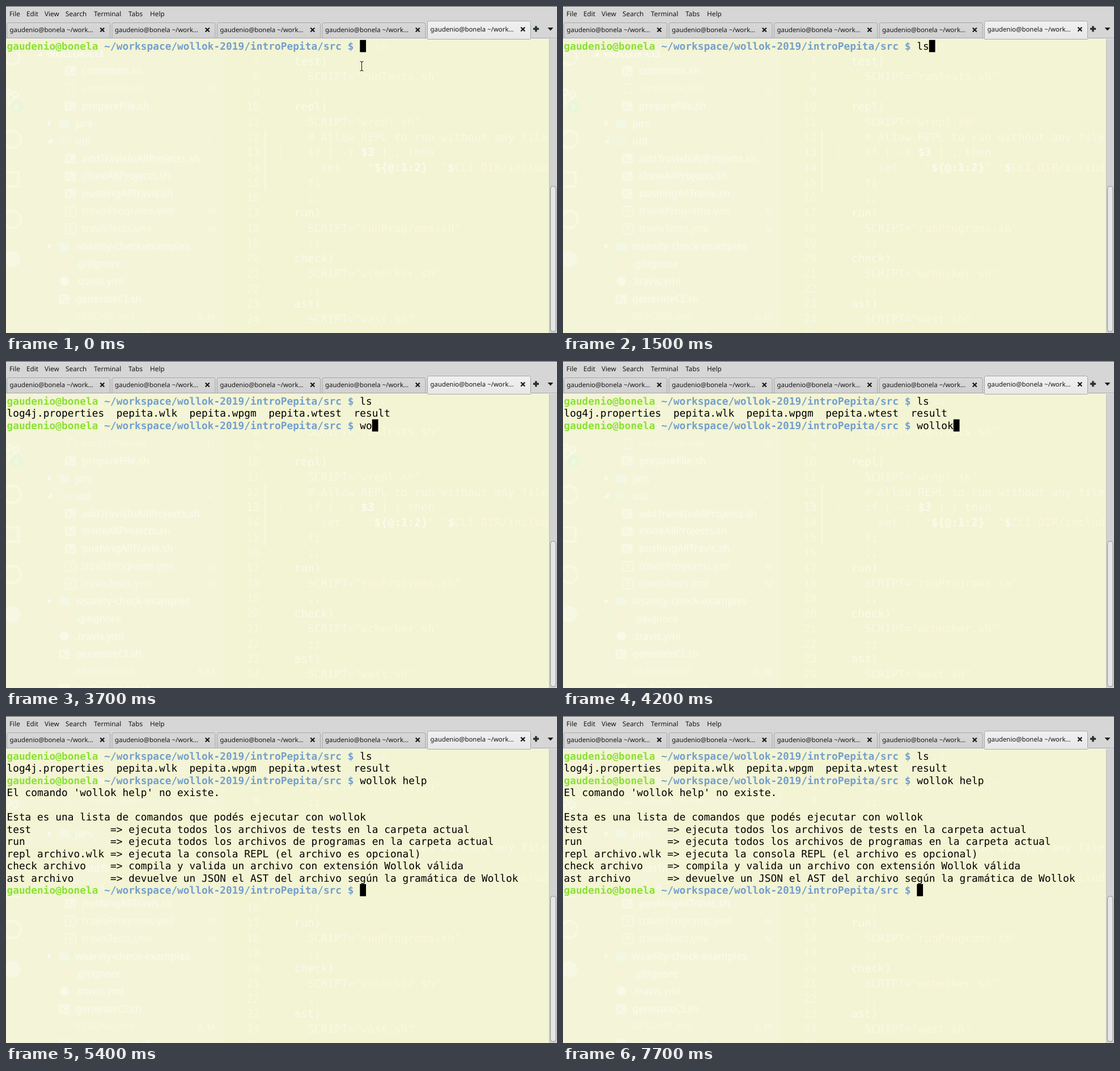
Animation of 972 by 576 pixels, one loop 8 s. Source, as an HTML page with a canvas:

```html
<!DOCTYPE html>
<html lang="es">
<head>
<meta charset="utf-8">
<title>Terminal</title>
<style>
html, body { margin: 0; width: 100%; height: 100%; overflow: hidden; background: #d6d6d6; }
canvas { display: block; }
</style>
</head>
<body>
<canvas id="stage" width="972" height="576"></canvas>
<script>
const W = 972, H = 576, LOOP = 8000;
const ctx = document.getElementById('stage').getContext('2d');
const MONO = '"DejaVu Sans Mono", monospace';
const SANS = '"Noto Sans", "Open Sans", sans-serif';
const CELL = 10.74, LEFT = 1.4, ROW = 21.47, TOP = 59.8;
const USER = 'gaudenio@bonela';
const PATH = ' ~/workspace/wollok-2019/introPepita/src $ ';
const PROMPT = USER.length + PATH.length;

const FILES = 'log4j.properties  pepita.wlk  pepita.wpgm  pepita.wtest  result';
const HELP = [
  "El comando 'wollok help' no existe.",
  '',
  'Esta es una lista de comandos que podés ejecutar con wollok',
  'test             => ejecuta todos los archivos de tests en la carpeta actual',
  'run              => ejecuta todos los archivos de programas en la carpeta actual',
  'repl archivo.wlk => ejecuta la consola REPL (el archivo es opcional)',
  'check archivo    => compila y valida un archivo con extensión Wollok válida',
  'ast archivo      => devuelve un JSON el AST del archivo según la gramática de Wollok'
];

// start time, commands already run, text being typed, block cursor, pointer
const STEPS = [
  [0, 0, '', 1, 1], [400, 0, '', 1], [500, 0, 'l', 1], [600, 0, 'ls', 1],
  [1200, 0, 'ls', 0], [1500, 0, 'ls', 1],
  [1600, 1, '', 1], [2100, 1, '', 0], [3200, 1, '', 1], [3500, 1, '', 0],
  [3600, 1, 'w', 1], [3700, 1, 'wo', 1], [3800, 1, 'wol', 1],
  [4000, 1, 'woll', 1], [4100, 1, 'wollo', 1], [4200, 1, 'wollok', 1],
  [4300, 1, 'wollok ', 1], [4500, 1, 'wollok h', 1],
  [4700, 1, 'wollok he', 1], [4800, 1, 'wollok help', 1],
  [5400, 2, '', 1], [6000, 2, '', 0], [6600, 2, '', 1],
  [7100, 2, '', 0], [7700, 2, '', 1]
];

const PAPER = '#f3f4d3';
const white = a => `rgba(255,255,255,${a})`;

function box(x, y, w, h, fill) {
  ctx.fillStyle = fill;
  ctx.fillRect(x, y, w, h);
}

function round(x, y, w, h, r, fill, line) {
  ctx.beginPath();
  ctx.roundRect(x, y, w, h, r);
  ctx.fillStyle = fill;
  ctx.fill();
  if (line) {
    ctx.strokeStyle = line;
    ctx.lineWidth = 1;
    ctx.stroke();
  }
}

function path(points, line, width, fill) {
  ctx.beginPath();
  points.forEach(([x, y], i) => i ? ctx.lineTo(x, y) : ctx.moveTo(x, y));
  if (fill) {
    ctx.fillStyle = fill;
    ctx.fill();
  } else {
    ctx.strokeStyle = line;
    ctx.lineWidth = width;
    ctx.stroke();
  }
}

function disc(x, y, r, fill) {
  ctx.beginPath();
  ctx.arc(x, y, r, 0, 7);
  ctx.fillStyle = fill;
  ctx.fill();
}

function ring(x, y, r) {
  ctx.beginPath();
  ctx.arc(x, y, r, 0, 7);
  ctx.strokeStyle = white(0.3);
  ctx.lineWidth = 4;
  ctx.stroke();
}

function label(text, x, y, size, color, weight = '') {
  ctx.font = `${weight} ${size}px ${SANS}`;
  ctx.fillStyle = color;
  ctx.fillText(text, x, y);
}

// Fixed pitch text, one glyph per cell
function mono(text, x, y, size, pitch, color, weight = '') {
  ctx.font = `${weight} ${size}px ${MONO}`;
  ctx.fillStyle = color;
  [...text].forEach((c, i) => c !== ' ' && ctx.fillText(c, x + i * pitch, y));
}

function drawActivity() {
  const tone = white(0.3);
  ring(11, 90, 13);
  path([[2, 100], [-6, 109]], tone, 4);
  ring(4, 152, 5);
  ring(17, 156, 5);
  path([[4, 157], [4, 176]], tone, 3);
  path([[17, 161], [5, 172]], tone, 3);
  disc(19, 177, 11, '#ebf5da');
  label('8', 15, 182, 13, white(0.6));
  ring(11, 235, 15);
  ctx.strokeRect(-2, 293, 24, 25);
  ring(11, 376, 15);
  disc(11, 446, 14, tone);
}

function drawTree() {
  // kind: s script, y yaml, d document, f folder, o open folder, r readme
  const tree = [
    ['s', 'commons.sh'], ['d', 'emptyFile.wlk', 'U'], ['s', 'prepareFile.sh'],
    ['f', 'jars'], ['o', 'util', '•'], ['s', 'addTravisInAllProjects.sh'],
    ['s', 'cloneAllProjects.sh'], ['s', 'pushingAllTravis.sh'],
    ['y', 'travisPrograms.yml', 'M'], ['y', 'travisTests.yml', 'M'],
    ['f', 'wsanity-check-examples'], ['g', '.gitignore'], ['t', '.travis.yml'],
    ['s', 'generateCI.sh'], ['r', 'README.md', '8, M'], ['s', 'runPrograms.sh']
  ];
  label('WOLLOK-CLI', 72, 90, 16, white(0.5), 'bold');
  path([[54, 89], [63, 89], [63, 80]], 0, 0, white(0.5));
  tree.forEach(([kind, name, mark], i) => {
    const y = 114 + 30.9 * i;
    const deep = i < 3 || (i > 4 && i < 10);
    const x = deep ? 134 : 122.5, ix = deep ? 114 : 103;
    const dim = kind === 'd' || kind === 'r';
    label(name, x, y + 6, 17.75, white(dim ? 0.26 : kind === 'y' ? 0.44 : 0.54));
    if (mark) label(mark, mark.length > 1 ? 338 : 356, y + 6, 15, white(0.36));
    if (kind === 's') {
      round(ix - 10, y - 8, 19, 17, 2, white(0.34));
      path([[ix - 6, y - 4], [ix - 2, y], [ix - 6, y + 4]], PAPER, 2);
      path([[ix, y + 4], [ix + 6, y + 4]], PAPER, 2);
    } else if (kind === 'y') {
      round(ix - 9, y - 8, 18, 17, 1, white(0), white(0.55));
      label('Y', ix - 4, y + 5, 13, white(0.5));
    } else if (kind === 'd') {
      round(ix - 6, y - 8, 13, 17, 1, white(0), white(0.35));
    } else if (kind === 'f' || kind === 'o') {
      const tint = kind === 'f' ? '#f2f8e4' : '#f1f7dc';
      box(ix - 9, y - 7, 9, 2, tint);
      box(ix - 9, y - 5, 18, 13, tint);
      const arrow = kind === 'f'
        ? [[74, y - 5], [80, y], [74, y + 5]]
        : [[72, y + 4], [81, y + 4], [81, y - 5]];
      path(arrow, 0, 0, white(0.5));
    } else if (kind === 'r') {
      label('M↓', ix - 8, y + 5, 12, '#eff6dc', 'bold');
    } else {
      disc(ix, y, 8, kind === 'g' ? '#f8f3d6' : white(0.4));
    }
  });
}

function drawCode() {
  const size = 19.55, pitch = 11.77, x0 = 508.5;
  const code = [
    'test)', '  SCRIPT="runTests.sh"', '  ;;',
    'repl)', '  SCRIPT="wrepl.sh"', '  # Allow REPL to run without any file',
    '  if [ -z $3 ] ; then', '    set -- "${@:1:2}" "$CLI_DIR/includ', '  fi', '  ;;',
    'run)', '  SCRIPT="runPrograms.sh"', '  ;;',
    'check)', '  SCRIPT="wchecker.sh"', '  ;;',
    'ast)', '  SCRIPT="wast.sh"', '  ;;'
  ];
  const tones = [
    [/\$\{.*\}|\$\d?/g, white(0.6), 'bold'],
    [/".*$/g, 'rgba(255,252,234,.55)'],
    [/\S/g, white(0.44)]
  ];
  mono('in', 649.5, 77, size, pitch, white(0.28));
  code.forEach((line, i) => {
    const y = 104 + 26.7 * i, n = String(i + 7);
    mono(n, 447.5 - n.length * pitch, y, size, pitch, white(i === 6 ? 0.5 : 0.38));
    if (line[0] !== ' ') return mono(line, x0, y, size, pitch, white(0.56));
    let rest = line;
    for (const [rule, color, weight] of tones) {
      rest = rest.replace(rule, (part, at) => {
        mono(part, x0 + at * pitch, y, size, pitch, color, weight);
        return ' '.repeat(part.length);
      });
    }
  });
  box(455, 218, 4, 107, white(0.25));
  box(485, 244, 1, 27, white(0.3));
  box(508, 108, 1, 54, white(0.1));
  box(532, 271, 1, 27, white(0.15));
}

function drawChrome() {
  box(0, 0, W, 58, '#d6d6d6');
  box(0, 0, W, 1, '#555');
  const menu = { File: 6, Edit: 36, View: 68, Search: 105, Terminal: 155, Tabs: 216, Help: 254 };
  for (const name in menu) label(name, menu[name], 17.5, 11.8, '#151515');
  for (let i = 0; i < 5; i++) {
    const x = 1 + 185.5 * i, on = i === 4, y = on ? 41 : 42;
    const fill = ctx.createLinearGradient(0, 27, 0, 57);
    fill.addColorStop(0, on ? '#f0f0f0' : '#d8d8d8');
    fill.addColorStop(1, on ? '#e8e8e8' : '#d0d0d0');
    round(x + 0.5, on ? 26.5 : 29.5, 182, on ? 32 : 27, [3, 3, 0, 0], fill, '#a6a6a6');
    label(USER + ' ~/work...', x + 5.5, y + 4, 11.4, '#151515');
    const cx = x + 168.8;
    path([[cx - 3.5, y - 3.5], [cx + 3.5, y + 3.5]], '#1c1c1c', 2.3);
    path([[cx + 3.5, y - 3.5], [cx - 3.5, y + 3.5]], '#1c1c1c', 2.3);
  }
  box(0, 56, 743, 1, '#a8a8a8');
  box(925, 56, 47, 1, '#a8a8a8');
  box(0, 57, W, 1, '#ececec');
  box(930, 38.5, 10, 3.5, '#27332b');
  box(933.2, 35.3, 3.5, 10, '#27332b');
  path([[955.5, 38], [965.5, 38], [960.5, 43.5]], 0, 0, '#1c1c1c');

  box(958, 58, 14, H - 58, '#d2d2d2');
  box(958, 58, 1, H - 58, '#bebebe');
  round(960.5, 317.5, 9.5, 256, 4, '#e6e6e6', '#8f8f8f');
}

// Printed cells hide the window shining through
function print(text, row, col = 0, color = '#000', weight = '') {
  for (const run of text.matchAll(/\S+( \S+)*/g)) {
    box(LEFT + (col + run.index) * CELL, TOP + row * ROW, run[0].length * CELL, ROW, PAPER);
  }
  mono(text, LEFT + col * CELL, Math.round(77 + row * ROW), 17.84, CELL, color, weight);
}

function prompt(row, command) {
  print(USER, row, 0, '#8ae234', 'bold');
  print(PATH, row, USER.length, '#729fcf', 'bold');
  print(command, row, PROMPT);
}

function drawPointer() {
  const bar = [[624.5, 97.5], [627.5, 98.5], [630.5, 97.5]];
  const foot = bar.map(([x, y]) => [x, 212 - y]);
  const stem = [[627.5, 98], [627.5, 114]];
  for (const [color, width] of [[white(0.7), 3], ['#222', 1.2]]) {
    [bar, stem, foot].forEach(part => path(part, color, width));
  }
}

function draw([, done, typed, cursor, pointer]) {
  box(0, 0, W, H, PAPER);
  box(0, 58, 386, H, white(0.1));
  drawActivity();
  drawTree();
  drawCode();
  drawChrome();
  if (done > 0) {
    prompt(0, 'ls');
    print(FILES, 1);
  }
  if (done > 1) {
    prompt(2, 'wollok help');
    HELP.forEach((line, i) => print(line, 3 + i));
  }
  const row = [0, 2, 11][done];
  prompt(row, typed);
  if (cursor) box(LEFT + (PROMPT + typed.length) * CELL, TOP + row * ROW, CELL, ROW, '#000');
  if (pointer) drawPointer();
}

ctx.textRendering = 'geometricPrecision';
const start = performance.now();
let shown;

function tick() {
  const t = (performance.now() - start) % LOOP;
  const step = STEPS.findLast(s => s[0] <= t);
  if (step !== shown) draw(shown = step);
  requestAnimationFrame(tick);
}
tick();
</script>
</body>
</html>
```
